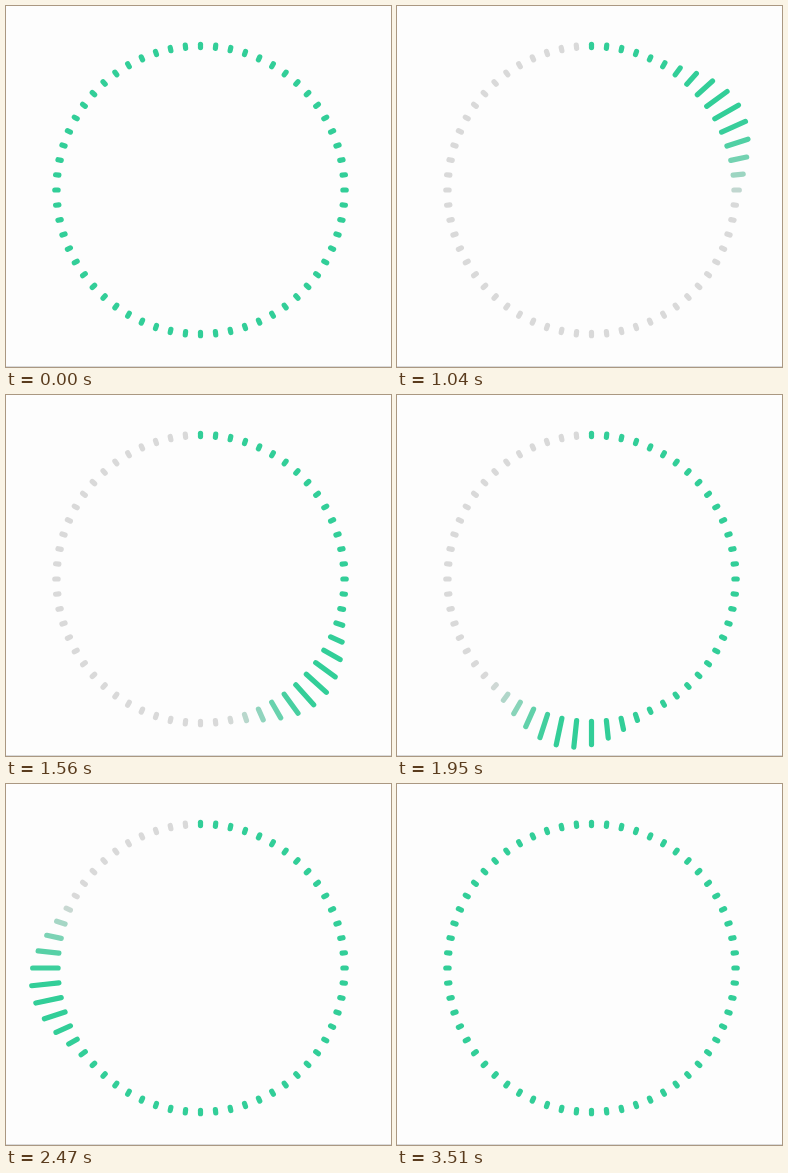
Write an HTML page that moves like this. It is 385 px wide and 361 px high and loops after 3.64 s.

```html
<!DOCTYPE html>
<html lang="en">
<head>
<meta charset="utf-8">
<title>Tick ring</title>
<style>
  html, body { margin: 0; width: 100%; height: 100%; overflow: hidden; background: #fdfdfd; }
  svg { display: block; width: 385px; height: 361px; }
  .ring line { stroke-width: 5.2; stroke-linecap: round; }
</style>
</head>
<body>
<svg viewBox="0 0 385 361">
  <rect y="360" width="385" height="1" fill="#dadada"/>
  <g class="ring" transform="translate(194.5 184)"></g>
</svg>
<script>
  const COUNT = 60, STEP = 130, STEPS = 28;
  const RESET_STEP = 3;              // the full ring turns grey here
  const SPEED = 3.07;                // ticks the wave travels per step
  const HALF_WIDTH = 6;              // ticks from crest to foot
  const INNER = 142.4, REST = 3.3, SWELL = 24;
  const GREY = [217, 217, 217], GREEN = [50, 206, 152];

  const ring = document.querySelector('.ring');
  const ticks = Array.from({ length: COUNT }, (_, i) => {
    const line = document.createElementNS('http://www.w3.org/2000/svg', 'line');
    line.setAttribute('transform', `rotate(${i * 360 / COUNT})`);
    line.setAttribute('y1', -INNER);
    return ring.appendChild(line);
  });

  const mix = p => `rgb(${GREY.map((c, i) => Math.round(c + (GREEN[i] - c) * p))})`;

  function draw(step) {
    const crest = 10.15 + SPEED * (step - 8);
    ticks.forEach((line, i) => {
      const ahead = i - crest;
      const wave = step >= RESET_STEP && Math.abs(ahead) < HALF_WIDTH
        ? Math.cos(Math.PI * ahead / (2 * HALF_WIDTH)) ** 2 : 0;
      const done = step < RESET_STEP || ahead <= 0;
      line.setAttribute('y2', -(INNER + REST + SWELL * wave));
      line.setAttribute('stroke', mix(done ? 1 : wave ** 0.8));
    });
  }

  const start = performance.now();
  function frame() {
    draw(Math.floor((performance.now() - start) / STEP) % STEPS);
    requestAnimationFrame(frame);
  }
  frame();
</script>
</body>
</html>
```
